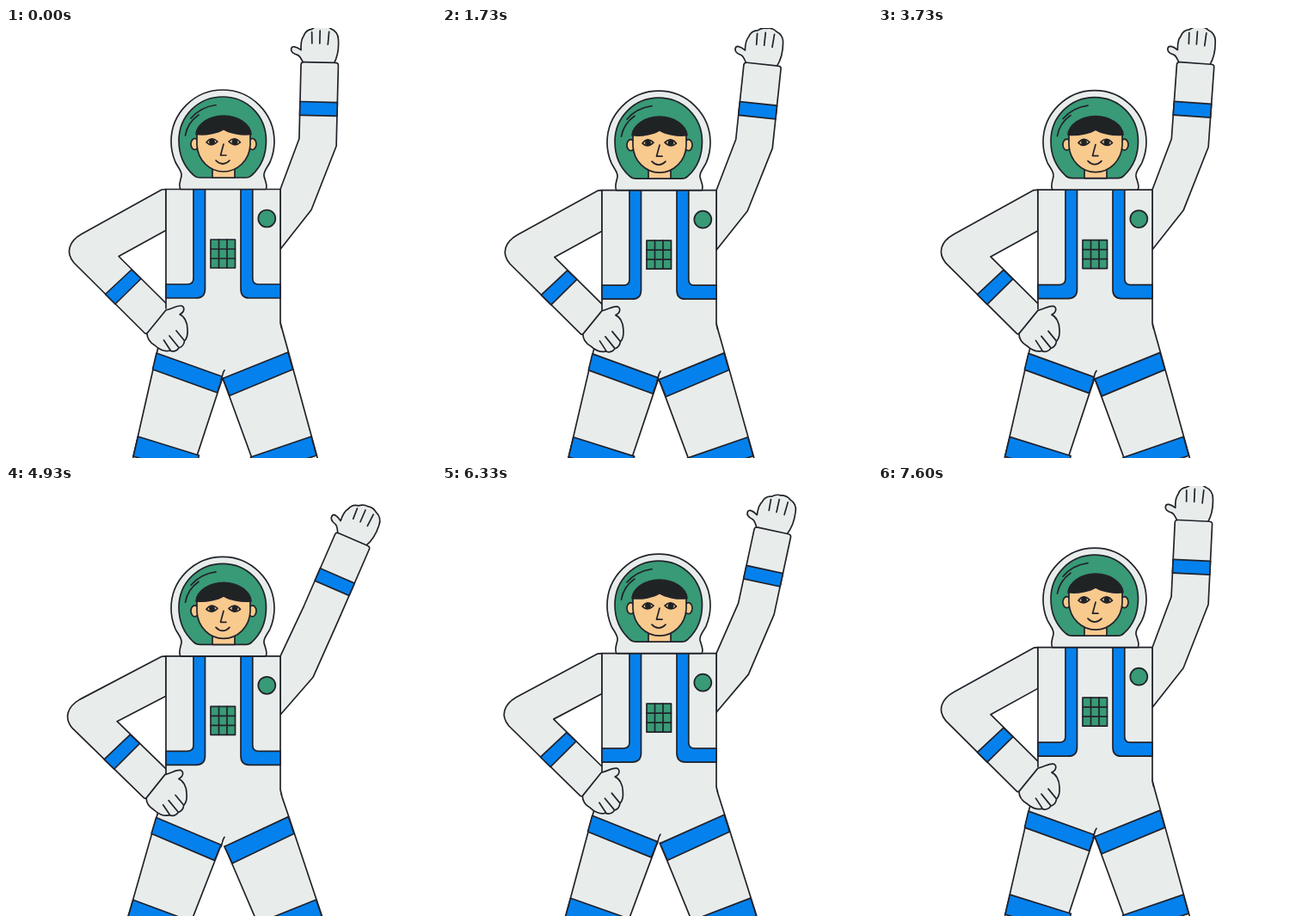
These frames come from a looping animation (500 px wide and 500 px high, 7660 ms). An HTML page:

```html
<!DOCTYPE html>
<html lang="en">
<head>
<meta charset="utf-8">
<title>Waving astronaut</title>
<style>
  html, body { margin: 0; width: 100%; height: 100%; overflow: hidden; background: #fff; }
  svg { display: block; width: 100%; height: 100%; stroke: #22222a; stroke-width: 1.7; stroke-linejoin: round; stroke-linecap: round; fill: none; }
  .suit { fill: #e8edec; }
  .blue { fill: #0481ed; }
  .green { fill: #389a76; }
  .skin { fill: #f9ca8e; }
  .dark { fill: #202324; }
  .bare { stroke: none; }
</style>
</head>
<body>
<svg viewBox="0 0 500 500">
  <g id="legL">
    <path class="suit bare" d="M186 335L176 375L142 525H213L252 406V335Z"/>
    <path d="M186 338L176 375L142 525M252 406L213 525"/>
    <path class="blue" d="M175 378L252 405.500L245.500 424L170.500 397Z"/>
    <path class="blue" d="M153.500 475L224.500 497L218 520L148 498Z"/>
  </g>
  <g id="legR">
    <path class="suit bare" d="M319 335L328.500 375L369 525H295L252 406V335Z"/>
    <path d="M319 343L328.500 377L369 525M252 407L295 525"/>
    <path class="blue" d="M252 407.500L328 377L333.500 397L260 427.500Z"/>
    <path class="blue" d="M284.500 499L355 475L361 497L291 520Z"/>
  </g>

  <path id="armL" class="suit"/>
  <g class="foreL">
    <path class="blue" d="M146 281L157 291.500L127 321L115.500 309.500Z"/>
  </g>

  <g id="foreR">
    <path class="suit" d="M-19 -92C-22 -97 -23 -100 -26 -101C-30 -102 -34 -104 -33.500 -108C-33 -112 -28 -111 -22 -107C-22.500 -113 -22.500 -119 -19.500 -123C-18 -128 -14 -131 -10 -131.500C-7 -134 -3 -135.500 0 -135C4 -136 9 -135 12 -132.500C17 -131 21 -126 21 -120C22 -110 21 -101 16.500 -92Z"/>
    <path d="M-10 -128L-9.500 -115M-.5 -130L-.5 -115M10 -129L9 -114"/>
  </g>
  <path id="armR" class="suit"/>
  <g id="bandR">
    <path class="blue" d="M-21.700 -47H21.700V-31.200H-21.700Z"/>
  </g>

  <g id="body">
    <path class="suit bare" d="M186 187.500H319V343L321 368L253 400L180 368L186 335Z"/>
    <path d="M186 326V187.500H319V343L320.500 349M254 398C251 402 252 405 250 409"/>
    <path class="blue" d="M218 187.500H231.500V303.500Q231.500 314 221 314H186V298H211Q218 298 218 291Z"/>
    <path class="blue" d="M273 187.500H286.800V291Q286.800 298 293 298H319V314H283Q273 314 273 303.500Z"/>
    <circle class="green" cx="303.300" cy="221.500" r="10"/>
    <path class="green" d="M238 246H266.500V279H238Z"/>
    <path d="M247.500 246V279M257 246V279M238 257H266.500M238 268H266.500"/>

    <path class="suit" d="M203 187.500C200 184 203 177 204 172C205 167 200 162 197 156C194 149 192 141 192 132C192 99 219 72 252 72C285 72 312 99 312 132C312 141 310 149 307 156C304 162 299 167 300 172C301 177 305 184 302 187.500Z"/>
    <path class="green" d="M226 174C222 174 220 173 218 171C207 161 201 147 201 131C201 102 224 80 252 80C280 80 302.500 102 302.500 131C302.500 147 297 161 286 171C284 173 282 174 279 174Z"/>
    <path d="M215 105Q226 92 244 89.500M208.500 125Q211 110 224 101"/>
    <path class="skin" d="M240 160V174H266V160Z"/>
    <ellipse class="skin" cx="219.500" cy="135" rx="4.500" ry="6.500"/>
    <ellipse class="skin" cx="286.500" cy="135" rx="4.500" ry="6.500"/>
    <path class="skin" d="M222 120V136C223 154 237 167 253 167C269 167 283 154 284 136V120C272 104 234 104 222 120Z"/>
    <path class="dark" d="M221 123.500C222 112 236 102 253 102C270 102 284 112 285 123.500C273 125 260 122 253 117.500C246 122 233 125 221 123.500Z"/>
    <path d="M233 133Q239 125 246 132Q239 139 233 133ZM259 132Q266 125 272.500 133Q266 139 259 132Z"/>
    <circle class="dark bare" cx="239.500" cy="132.300" r="3.400"/>
    <circle class="dark bare" cx="266" cy="132.300" r="3.400"/>
    <path d="M253 135L249.500 148H256M244 154Q252 162 260 154"/>
  </g>

  <g class="foreL">
    <path class="suit" d="M164 355L186 328C194 326 198 323 203 323C208 323 208.500 330 202 333C207 335 211 342 211 350C211.500 356 210.500 361 207.500 364C207 368 204 371 201 372C199 375.500 194 377 190.500 375C184 377 177 373 173 369C168 366 164 361 164 355Z"/>
    <path d="M198 352L207 363M190 358L200.500 371M183.500 363L191 374.500"/>
  </g>
</svg>
<script>
const PERIOD = 1915, LOOP = 4 * PERIOD, RAD = Math.PI / 180;
const el = id => document.getElementById(id);
const set = (node, name, value) => node.setAttribute(name, value);
const foreL = document.querySelectorAll('.foreL');

// Pose holds: one long hold, then nineteen short ones in every 800 ms
function hold(t) {
  const u = t % 800, step = 730 / 19;
  return t - u + (u < 70 ? 0 : 70 + Math.floor((u - 70) / step) * step);
}

const wave = (t, lag) => (1 - Math.cos(2 * Math.PI * (t - lag) / PERIOD)) / 2;

// Rotates a point about a pivot, then shifts it
function turn(cx, cy, deg, dx, dy) {
  const c = Math.cos(deg * RAD), n = Math.sin(deg * RAD);
  return (x, y) => `${cx + dx + (x - cx) * c - (y - cy) * n} ${cy + dy + (x - cx) * n + (y - cy) * c}`;
}

function pose(t) {
  const s = wave(t, 0), drop = 10.7 * s;
  set(el('body'), 'transform', `translate(0 ${drop})`);
  set(el('legL'), 'transform', `translate(0 ${drop}) rotate(${3.3 * s} 224 370)`);
  set(el('legR'), 'transform', `translate(0 ${drop}) rotate(${-3.3 * s} 280 370)`);

  const dx = -2 * s, dy = 8.9 * s, tilt = -0.6 * s;
  const p = turn(95, 255, tilt, dx, dy);
  for (const g of foreL) set(g, 'transform', `translate(${dx} ${dy}) rotate(${tilt} 95 255)`);
  set(el('armL'), 'd', `M186 ${187.5 + drop}L181 ${188 + drop}L${p(88, 239.5)}` +
    `C${p(73, 248)} ${p(69, 261)} ${p(79, 273)}L${p(161, 354.5)}Q${p(163, 356.5)} ${p(166, 354)}` +
    `L${p(187, 328)}Q${p(190, 325)} ${p(187, 321)}L${p(131, 265.5)}L186 ${235.2 + 9.5 * s}Z`);

  // Raised arm: mitred elbow between the upper arm and the waving forearm
  const ex = 362.5 + 4.3 * s, ey = 133 + 15 * s;
  const upper = 21 + 2.6 * s, fore = 0.8 + 22.7 * wave(t, 100);
  const half = 21.7, miter = half / Math.cos((upper - fore) / 2 * RAD);
  const bend = turn(0, 0, (upper + fore) / 2, ex, ey);
  const q = turn(0, 0, fore, ex, ey);
  set(el('armR'), 'd', `M319 ${187.5 + drop}L${bend(-miter, 0)}L${q(-half, -90)}` +
    `Q${q(-half, -93)} ${q(-18, -93)}L${q(18, -93)}Q${q(half, -93)} ${q(half, -90)}` +
    `L${bend(miter, 0)}L${355 + 2 * s} ${211.5 + 11.5 * s}L319 ${257.3 + 9 * s}Z`);
  for (const id of ['foreR', 'bandR']) set(el(id), 'transform', `translate(${ex} ${ey}) rotate(${fore})`);
}

const start = performance.now();
function frame() {
  pose(hold((performance.now() - start) % LOOP));
  requestAnimationFrame(frame);
}
frame();
</script>
</body>
</html>
```
